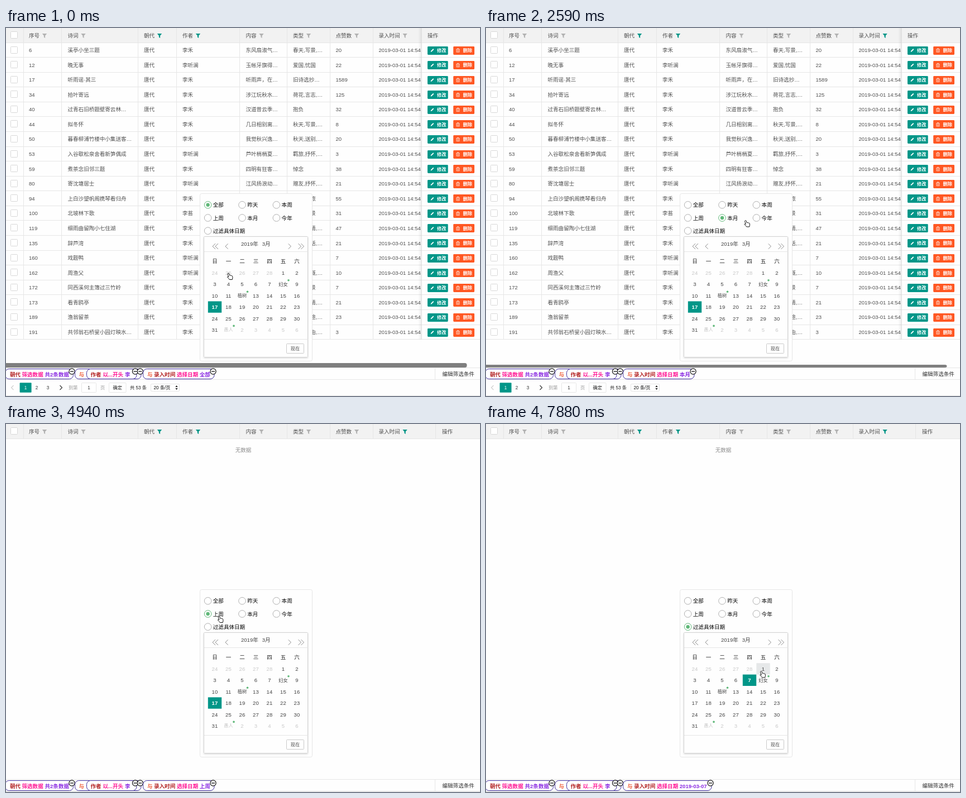
An HTML page that plays this animation: 849 by 659 pixels, repeating every 8000 ms.

```html
<!DOCTYPE html>
<html lang="zh-CN">
<head>
<meta charset="utf-8">
<style>
html, body { margin: 0; width: 100%; height: 100%; overflow: hidden; background: #fefefe; }
svg { display: block; position: absolute; left: 0; top: 0; }
text { font-family: "Liberation Sans", "Noto Sans CJK SC", "Noto Sans CJK", sans-serif; font-size: 9.55px; white-space: pre; }
.s { font-size: 8.2px; }
.b { font-weight: bold; }
.m { text-anchor: middle; }
</style>
</head>
<body>
<svg id="stage" width="849" height="659" viewBox="0 0 849 659">
  <defs>
    <clipPath id="left"><rect width="744" height="600"/></clipPath>
    <linearGradient id="shade"><stop offset="0" stop-opacity="0"/><stop offset="1" stop-opacity=".07"/></linearGradient>
    <filter id="soft" x="-10%" y="-10%" width="120%" height="120%"><feDropShadow dx="0" dy="1.4" stdDeviation="1.4" flood-opacity=".14"/></filter>
  </defs>
</svg>
<script>
const stage = document.getElementById('stage');
const TEAL = '#009688', GREEN = '#5fb878', LINE = '#e6e6e6', INK = '#505050';

function el(parent, tag, attrs = {}, str) {
  const e = document.createElementNS('http://www.w3.org/2000/svg', tag);
  for (const k in attrs) e.setAttribute(k, attrs[k]);
  if (str !== undefined) e.textContent = str;
  return parent.appendChild(e);
}
const group = (parent, attrs) => el(parent, 'g', attrs);
const rect = (p, x, y, w, h, fill, more) => el(p, 'rect', { x, y, width: w, height: h, fill, ...more });
const path = (p, d, stroke, more) => el(p, 'path', { d, stroke, fill: 'none', ...more });
// y is the vertical middle of the line of text
const text = (p, x, y, str, fill = INK, cls = '') =>
  el(p, 'text', { x, y: y + (cls.includes('s') ? 3 : 3.5), fill, class: cls }, str);
const show = (e, on) => { e.style.display = on ? '' : 'none'; };

// ---- table ----
const edges = [31.5, 99.5, 236.5, 305.5, 418.5, 503.5, 580.5, 657.5];
const starts = [41, 110.5, 247, 316, 429.5, 514, 590.5, 667.5];
const pitch = 26.58, top0 = 26;
const authors = { a: '李禾', b: '李听澜', c: '李苔' };
const rows = `6|溪亭小坐三题|a|东风扇淑气…|春天,写景,…|20
12|晚无事|b|玉帐牙旗得…|爱国,忧国|22
17|听雨谣·其三|a|听雨声，在…|旧诗选抄…|1589
34|拾叶寄远|a|涉江玩秋水…|荷花,言志,…|125
40|过青石旧桥题壁寄云林…|a|汉道昔云季…|抱负|32
44|拟冬怀|a|几日相别离…|秋天,写景,…|8
50|暮春柳浦竹楼中小集送客…|a|我觉秋兴逸…|秋天,送别,…|20
53|入谷歇松泉舍看新笋偶成|b|芦叶梢梢夏…|羁旅,抒怀,…|3
59|煮茶念旧邻三题|a|四明有狂客…|悼念|38
80|寄沈塘居士|b|江风扬浪动…|赠友,抒怀,…|21
94|上白沙望帆阁携琴看归舟|a||写景,羁旅|55
100|北坡林下歌|c||山水,写景|31
119|细雨曲留陶小七住湖|a||送别,友情,…|47
135|辞芦湾|a||离别,生活,…|21
160|戏题鸭|b||咏物|7
162|周渔父|b||感伤,感慨,…|10
172|同西溪何主簿过三竹岭|a||山水,写景|7
173|看青鸥亭|a||楼阁,抒情,…|21
189|渔翁留茶|a||归隐,仕途,…|23
191|共邻翁石桥叟小园灯映水…|a||宴饮,自由,…|3`.split('\n').map(r => r.split('|'));

const checkbox = (p, y) => rect(p, 8.5, Math.round(y) - 6.5, 12, 12, '#fff', { stroke: '#d8d8d8', rx: 1 });

const head = group(stage);
rect(head, 0, 0, 849, 26, '#f2f2f2');
path(head, 'M0 26.5H849' + edges.map(x => `M${x} 0V26`).join(''), LINE);
checkbox(head, 13.3);
const funnels = ['序号', '诗词', '朝代', '作者', '内容', '类型', '点赞数', '录入时间'].map((name, i) => {
  const x = starts[i];
  text(head, x, 13, name);
  return el(head, 'path', {
    d: `M${x + name.length * 9.55 + 4.7} 10h8.4l-3.1 3.7v4.2l-2.2 -1.3v-2.9z`,
    fill: i == 2 || i == 3 ? TEAL : '#b2b2b2'
  });
});
const headData = group(head), headNone = group(head);
text(headData, 755, 13, '操作');
path(headData, 'M744.5 0V26', '#ddd');
text(headNone, 781, 13, '操作');
path(headNone, 'M769.5 0V26', LINE);

const body = group(stage);
const cells = group(body, { 'clip-path': 'url(#left)' });
const bottom = top0 + pitch * rows.length;
path(cells, edges.map(x => `M${x} 26V${bottom}`).join(''), LINE);
rows.forEach(([id, title, who, line, kind, likes], i) => {
  const y = 39.5 + pitch * i, by = Math.round(y) - 7;
  checkbox(cells, y);
  [id, title, '唐代', authors[who], line, kind, likes, '2019-03-01 14:54'].forEach((s, k) =>
    text(cells, starts[k], y, s));
  path(body, `M0 ${Math.floor(top0 + pitch * (i + 1)) + .5}H849`, LINE);
  rect(body, 755, by, 36.7, 15, TEAL, { rx: 1.4 });
  rect(body, 801.2, by, 37.8, 15, '#ff5722', { rx: 1.4 });
  path(body, `M760.6 ${y + 3.3}l.5 -1.7 4 -4 1.3 1.3 -4 4z`, 'none', { fill: '#fff' });
  path(body, `M806.3 ${y - 1.3}h6.4M808.3 ${y - 1.5}v-1.3h2.4v1.3M807 ${y - 1.1}v4.8h5v-4.8M808.7 ${y + .3}v2.2M810.3 ${y + .3}v2.2`, '#fff', { 'stroke-width': .7 });
  text(body, 772, y + .4, '修改', '#fff', 's b');
  text(body, 818.5, y + .4, '删除', '#fff', 's b');
});
rect(body, 738, 0, 6, bottom, 'url(#shade)');
path(body, `M744.5 0V${bottom}`, '#e0e0e0');

// scrollbar and pager
const thumb = rect(body, -4, 600, 829.5, 8, '#7f7f7f', { rx: 3.5 });
path(body, 'M13.5 640l-4 4 4 4', '#ccc', { 'stroke-width': 1.1 });
rect(body, 24.6, 635.2, 21, 17.6, TEAL, { rx: 1 });
text(body, 35, 644, '1', '#fff', 's m');
text(body, 55, 644, '2', '#333', 's m');
text(body, 75, 644, '3', '#333', 's m');
path(body, 'M96.5 640l4 4 -4 4', '#333', { 'stroke-width': 1.1 });
text(body, 112, 644, '到第', '#999', 's');
rect(body, 135.5, 635.5, 26, 17, '#fff', { stroke: LINE, rx: 1 });
text(body, 148.5, 644, '1', '#333', 's m');
text(body, 169, 644, '页', '#999', 's');
rect(body, 184.5, 635.5, 30.5, 17, '#fff', { stroke: LINE, rx: 1 });
text(body, 191.5, 644, '确定', '#222', 's');
text(body, 222, 644, '共 53 条', '#222', 's');
rect(body, 259.5, 637.5, 51, 13, '#fff', { stroke: LINE, rx: 1.5 });
text(body, 264.5, 644, '20 条/页', '#111', 's');
path(body, 'M303.3 643l2.2 -3 2.2 3zM303.3 645l2.2 3 2.2 -3z', 'none', { fill: '#222' });

const none = group(stage);
text(none, 425, 46, '无数据', '#8c8c8c', 'm');

// ---- filter bar, drawn for the upper position ----
const blankLine = path(stage, 'M0 629.5H849', LINE);
path(stage, 'M0 658.5H849', LINE);
const bar = group(stage);
path(bar, 'M0 608.5H849M0 629.5H849M768.5 609V630', LINE);
text(bar, 781.5, 619, '编辑筛选条件', '#333');
const RED = '#b22222', PINK = '#ff1493', VIOLET = '#8a2be2', CORAL = '#f06543';
const pill = (x, w, y = 610.5, h = 18) => rect(bar, x, y, w, h, '#fff', { stroke: '#3d2a9c', rx: 7 });
function minus(x) {
  const g = group(bar, { transform: `translate(${x} 0)` });
  el(g, 'circle', { r: 5.1, cx: 0, cy: 615, fill: '#fff', stroke: '#111', 'stroke-width': 1.2 });
  path(g, 'M-3 615H3', '#111', { 'stroke-width': 1.3 });
  return g;
}
const word = (x, s, c) => text(bar, x, 620, s, c, 'b');
pill(-1.5, 122);
word(7, '朝代', RED); word(28.5, '筛选数据', PINK); word(69.5, '共2条数据', VIOLET);
minus(118);
pill(123.5, 118.5);
pill(144.5, 89.5);
word(130.5, '与', CORAL); word(151.5, '作者', RED); word(173.5, '以...开头', PINK); word(213, '李', VIOLET);
minus(231.5); minus(240.3);
const lastPill = pill(245.5, 127);
word(253, '与', CORAL); word(265, '录入时间', RED); word(306, '选择日期', PINK);
const pick = word(346.8, '', VIOLET);
const lastMinus = minus(371);

// ---- date popup ----
const pop = group(stage);
rect(pop, 347.5, 296.5, 201, 300, '#fefefe', { stroke: LINE, rx: 3 });
const radios = ['全部', '昨天', '本周', '上周', '本月', '今年', '过滤具体日期'].map((name, i) => {
  const x = 361.6 + 61.4 * (i % 3), y = 316.8 + 23.2 * Math.floor(i / 3);
  const ring = el(pop, 'circle', { cx: x, cy: y, r: 6.3, fill: '#fff', stroke: '#b0b0b0' });
  const dot = el(pop, 'circle', { cx: x, cy: y, r: 3.2, fill: GREEN });
  text(pop, x + 9.2, y, name, '#000');
  return { ring, dot };
});
rect(pop, 354.5, 373.5, 186, 216, '#fefefe', { stroke: '#d2d2d2', rx: 1, filter: 'url(#soft)' });
path(pop, 'M355 400.5H540.5M355 557.5H540.5', LINE);
path(pop, 'M375 386l-5 5 5 5M380 386l-5 5 5 5M397.6 386.3l-4.6 4.7 4.6 4.7M505.8 386.3l4.6 4.7 -4.6 4.7M523.5 386l5 5 -5 5M528.5 386l5 5 -5 5', '#8c8c8c');
text(pop, 421, 386.3, '2019年', '#444');
text(pop, 458.7, 386.3, '3月', '#444');
const colX = j => 373.9 + 24.5 * j;
[...'日一二三四五六'].forEach((d, j) => text(pop, colX(j), 417.8, d, '#222', 'm'));
const feasts = { 12: '妇女', 16: '植树', 36: '愚人' };
const days = Array.from({ length: 42 }, (_, i) => {
  const x = colX(i % 7), y = 438.4 + 20.4 * Math.floor(i / 7), n = i - 4;
  const tint = n < 1 || n > 31 ? '#c8c8c8' : '#444';
  const back = rect(pop, x - 12.1, y - 10.2, 24.4, 20.4, 'none');
  const feast = feasts[i];
  const label = text(pop, x, y, feast || String(n < 1 ? n + 28 : n > 31 ? n - 31 : n), tint, feast ? 's m' : 'm');
  const dot = feast && el(pop, 'circle', { cx: x + 9.6, cy: y - 7, r: 1.8, fill: GREEN });
  return { back, label, dot, tint };
});
rect(pop, 502.5, 565.5, 31, 17, '#fff', { stroke: '#c9c9c9', rx: 1 });
text(pop, 518, 574.2, '现在', '#444', 's m');

const hand = path(stage, 'M2.5 .7q1.2 -.4 1.6 .8l1 3.2q1 -.7 1.7 .1q1 -.6 1.6 .3q1.3 -.3 1.7 1q.5 2 .2 3.5l-.6 2.4h-5q-1.2 -2 -2.8 -3.2q-1.6 -1.2 -.6 -1.9q1 -.5 2 .6l-1.7 -5.2q-.2 -1.2 .9 -1.6z', '#111', { fill: '#fff', 'stroke-linejoin': 'round' });

// ---- timeline: each step changes only what it names ----
const steps = [
  { t: 0, mode: 'data', radio: 0, lit: 1, chip: '全部', sel: { 21: 1 }, hover: -1, at: [395.5, 438.5] },
  { t: 180, at: [412, 395] },
  { t: 390, at: [424, 336] },
  { t: 600, at: [430, 322], radio: 1 },
  { t: 1040, mode: 'none', chip: '昨天' },
  { t: 1230, at: [433, 330] },
  { t: 1410, at: [435, 339] },
  { t: 1600, at: [436, 344.5] },
  { t: 1990, mode: 'blank', radio: 4, lit: .78 },
  { t: 2170, lit: 1 },
  { t: 2370, mode: 'data', chip: '本月' },
  { t: 2570, at: [462, 344] },
  { t: 2770, at: [492, 340] },
  { t: 3130, mode: 'blank', radio: 5, lit: .78 },
  { t: 3310, lit: 1 },
  { t: 3500, mode: 'data', chip: '今年' },
  { t: 3700, at: [462, 341] },
  { t: 3900, at: [412, 343] },
  { t: 4110, at: [379.5, 344.5] },
  { t: 4290, at: [378.5, 343.5] },
  { t: 4730, mode: 'none', radio: 3, lit: .78, chip: '上周' },
  { t: 4910, lit: 1 },
  { t: 5100, at: [381, 349] },
  { t: 5280, at: [385, 356] },
  { t: 5470, at: [388, 362] },
  { t: 5660, at: [390, 365] },
  { t: 5840, mode: 'blank', radio: 6, lit: .78 },
  { t: 6020, lit: 1, hover: 5, at: [487.5, 453] },
  { t: 6230, at: [490, 444] },
  { t: 6470, sel: { 5: 1 }, hover: -1, at: [489, 452] },
  { t: 6710, mode: 'none', chip: '2019-03-08', sel: { 5: .78, 12: .3 }, at: [464, 460] },
  { t: 6950, sel: { 12: 1 } },
  { t: 7130, sel: { 11: 1 }, chip: '2019-03-07' },
  { t: 7310, at: [472, 456] },
  { t: 7500, at: [481, 450] },
  { t: 7700, at: [487, 445] },
  { t: 7880, hover: 5, at: [490, 442] }
];
for (let i = 1; i < steps.length; i++) steps[i] = { ...steps[i - 1], ...steps[i] };

function draw(s) {
  const data = s.mode == 'data', blank = s.mode == 'blank', all = s.chip == '全部';
  show(head, !blank); show(body, data); show(none, s.mode == 'none');
  show(headData, data); show(headNone, !data);
  show(bar, !blank); show(blankLine, blank);
  bar.setAttribute('transform', `translate(0 ${data ? 0 : 28})`);
  funnels[7].setAttribute('fill', all ? '#b2b2b2' : TEAL);
  // the thumb is thick only until the first reload
  thumb.setAttribute('y', all ? 600 : 603);
  thumb.setAttribute('height', all ? 8 : 5);

  const end = s.chip.length > 2 ? 404 : 373;
  pick.textContent = s.chip;
  lastPill.setAttribute('width', end - 245.5);
  lastMinus.setAttribute('transform', `translate(${end - 2} 0)`);

  radios.forEach(({ ring, dot }, i) => {
    const on = i == s.radio;
    ring.setAttribute('stroke', on ? GREEN : '#b0b0b0');
    ring.setAttribute('stroke-opacity', on ? s.lit : 1);
    dot.setAttribute('opacity', on ? s.lit : 0);
  });
  days.forEach(({ back, label, dot, tint }, i) => {
    const a = s.sel[i] || 0;
    back.setAttribute('fill', a ? TEAL : i == s.hover ? '#e6e8e9' : 'none');
    back.setAttribute('fill-opacity', a || 1);
    label.setAttribute('fill', a > .5 ? '#fff' : tint);
    label.style.fontWeight = a == 1 ? 'bold' : 'normal';
    if (dot) show(dot, !a);
  });
  hand.setAttribute('transform', `translate(${s.at})`);
}

const start = performance.now();
let current = null;
function tick() {
  const t = (performance.now() - start) % 8000;
  const s = steps.findLast(k => k.t <= t);
  if (s !== current) draw(current = s);
  requestAnimationFrame(tick);
}
tick();
</script>
</body>
</html>
```
